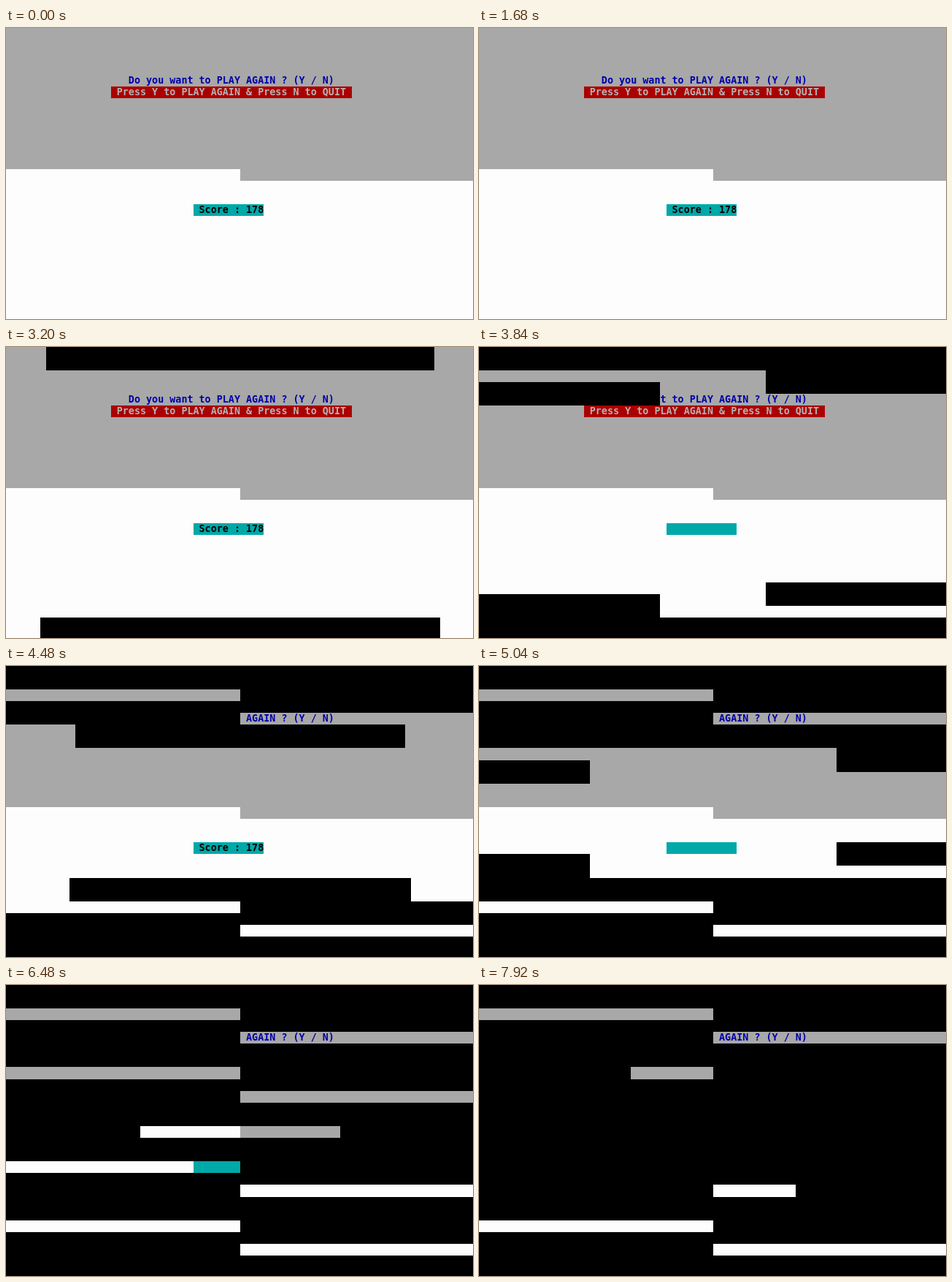
Animation, 640 px wide and 398 px high, one loop 8 s. Source, as an HTML page with a canvas:

```html
<!DOCTYPE html>
<html lang="en">
<head>
<meta charset="utf-8">
<title>Play again</title>
<style>
  html, body { margin: 0; height: 100%; overflow: hidden; background: #000; }
  canvas { display: block; width: 640px; height: 398px; }
</style>
</head>
<body>
<canvas id="screen" width="640" height="398"></canvas>
<script>
const ctx = document.getElementById('screen').getContext('2d');
const LOOP = 8000, STEP = 80, HALF = 40, LAST_ROW = 24;

// Text-mode grid, 80 x 25 cells
const colX = c => 8.058 * c - 1.35;
const rowY = r => 16.095 * r - 0.2;

// Each phase clears half-rows in the upper part; the lower part is its point mirror.
// 'grow' runs from the middle outwards, otherwise from the edges inwards.
const phases = [
  { grow: true,  rows: ['0LR', '1LR'] },
  { grow: false, rows: ['2R', '3LR', '4L'] },
  { grow: true,  rows: ['5LR', '6LR'] },
  { grow: false, rows: ['7R', '8LR', '9L'] },
  { grow: true,  rows: ['10LR', '11LR'] },
  { grow: false, rows: ['12LR'] },
  { grow: true,  rows: ['9R'] },
  { grow: false, rows: ['7L'] }
];

// Time in ms and number of cells wiped by then
const pace = [
  [2615, 0], [3200, 33.6], [4480, 108.6], [4960, 134.4], [5680, 177.3],
  [5840, 186.3], [6480, 223.2], [7600, 285.2], [7920, 306.2]
];

function wiped(t) {
  if (t <= pace[0][0]) return 0;
  const i = Math.max(1, pace.findIndex(([time]) => time >= t));
  const [t0, p0] = pace[i - 1], [t1, p1] = pace[i];
  return p0 + (p1 - p0) * (t - t0) / (t1 - t0);
}

function scoreVisible(t) {
  const toggles = t <= 3200 ? (t - 26.5) / 176.5 + 1 : (t - 3203.5) / 184 + 18;
  return Math.floor(toggles) % 2 === 0;
}

function cells(c0, c1, r0, r1, color) {
  const x = Math.round(colX(c0)), y = Math.round(rowY(r0));
  ctx.fillStyle = color;
  ctx.fillRect(x, y, Math.round(colX(c1)) - x, Math.round(rowY(r1)) - y);
}

function print(text, col, row, color) {
  ctx.fillStyle = color;
  [...text].forEach((ch, i) => ctx.fillText(ch, colX(col + i), rowY(row) + 12));
}

function wipeHalf(row, side, n, grow) {
  const start = side === 'L' ? (grow ? HALF - n : 0) : (grow ? HALF : 2 * HALF - n);
  cells(start, start + n, row, row + 1, '#000');
}

function wipe(p) {
  const count = (value, i) => Math.max(0, Math.min(HALF, Math.floor(value) - HALF * i));
  phases.forEach(({ grow, rows }, i) => {
    const upper = count(p, i), lower = count(p + 0.5, i);
    for (const spec of rows) {
      const row = parseInt(spec, 10);
      for (const side of spec.replace(/\d/g, '')) {
        wipeHalf(row, side, upper, grow);
        if (row !== 12) wipeHalf(LAST_ROW - row, side === 'L' ? 'R' : 'L', lower, grow);
      }
    }
  });
}

function draw(t) {
  ctx.font = 'bold 13.385px "DejaVu Sans Mono", monospace';
  cells(0, 80, -1, 25, '#fdfdfd');
  cells(0, 80, -1, 12, '#a8a8a8');
  cells(40, 80, 12, 13, '#a8a8a8');
  print('Do you want to PLAY AGAIN ? (Y / N)', 21, 4, '#0000a8');
  cells(18, 59, 5, 6, '#aa0000');
  print('Press Y to PLAY AGAIN & Press N to QUIT', 19, 5, '#b8b0b0');
  cells(32, 44, 15, 16, '#00a8a8');
  if (scoreVisible(t)) print('Score : 178', 33, 15, '#000');
  wipe(wiped(t));
}

function tick() {
  const t = performance.now() % LOOP;
  draw(Math.floor(t / STEP) * STEP);
  requestAnimationFrame(tick);
}
tick();
</script>
</body>
</html>
```
